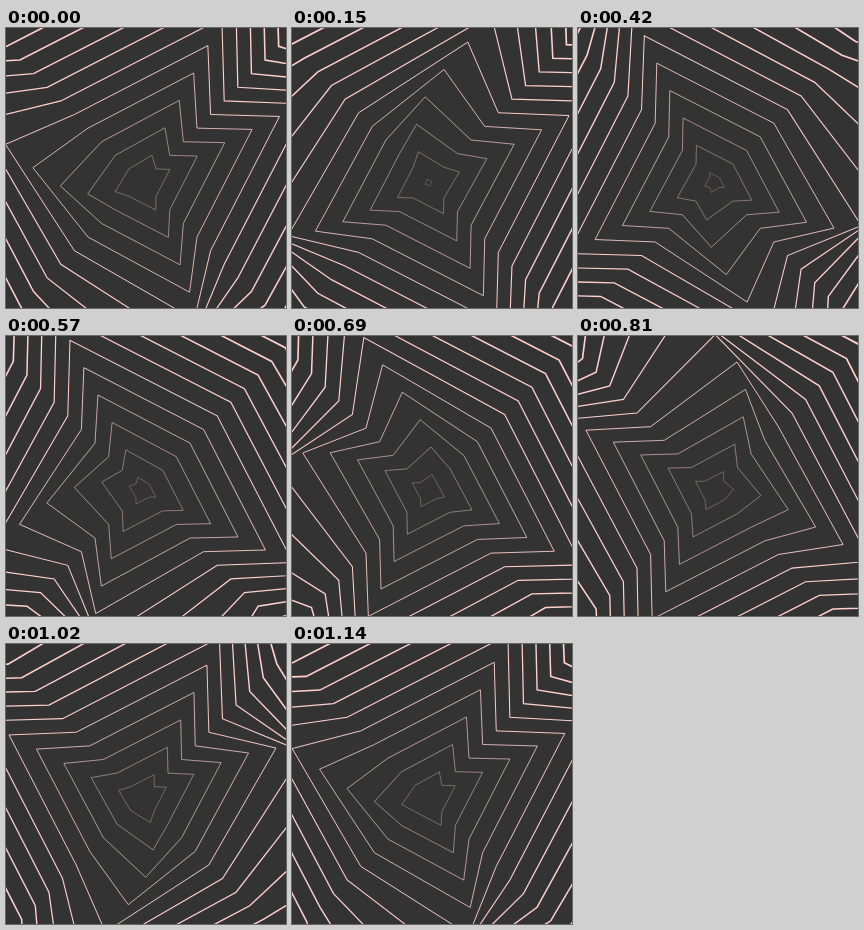
Recreate the animation shown at these times as an HTML page with a canvas. Size 280 by 280 pixels, loop 1.17 s.

```html
<!DOCTYPE html>
<html lang="en">
<head>
<meta charset="utf-8">
<title>Expanding rings</title>
<style>
  html, body { margin: 0; width: 100%; height: 100%; overflow: hidden; background: #333; }
  canvas { display: block; width: 280px; height: 280px; }
</style>
</head>
<body>
<canvas id="stage" width="280" height="280"></canvas>
<script>
const ctx = document.getElementById('stage').getContext('2d');
const LOOP = 1170, STEP = 30;
const CX = 136.5, CY = 154.6, GAP = 27.4, RINGS = 13;
const LAG = 0.027, START = 0.163;

// Tip position along its side: a sine pressed flat at both ends
const swing = p => 0.5 * Math.tanh(2.12 * Math.sin(2 * Math.PI * p));

function ring(n, time) {
  const r = n * GAP;
  let dx = 1, dy = 0;
  ctx.beginPath();
  for (let side = 0; side < 4; side++) {
    const at = (out, along) =>
      ctx.lineTo(CX + r * (out * dx - along * dy), CY + r * (out * dy + along * dx));
    at(1, swing(time - n * LAG - START - side / 8));
    at(0.497, 0.497);
    [dx, dy] = [-dy, dx];
  }
  ctx.closePath();
  ctx.lineWidth = 0.2 + 0.15 * n;
  ctx.stroke();
}

function draw(now) {
  const time = Math.floor((now % LOOP) / STEP) * STEP / LOOP;
  ctx.fillStyle = '#333';
  ctx.fillRect(0, 0, 280, 280);
  ctx.strokeStyle = '#ffd0cc';
  for (let k = 0; k < RINGS; k++) {
    if (k + time > 0) ring(k + time, time);
  }
}

const begin = performance.now();
function tick() {
  draw(performance.now() - begin);
  requestAnimationFrame(tick);
}
tick();
</script>
</body>
</html>
```
